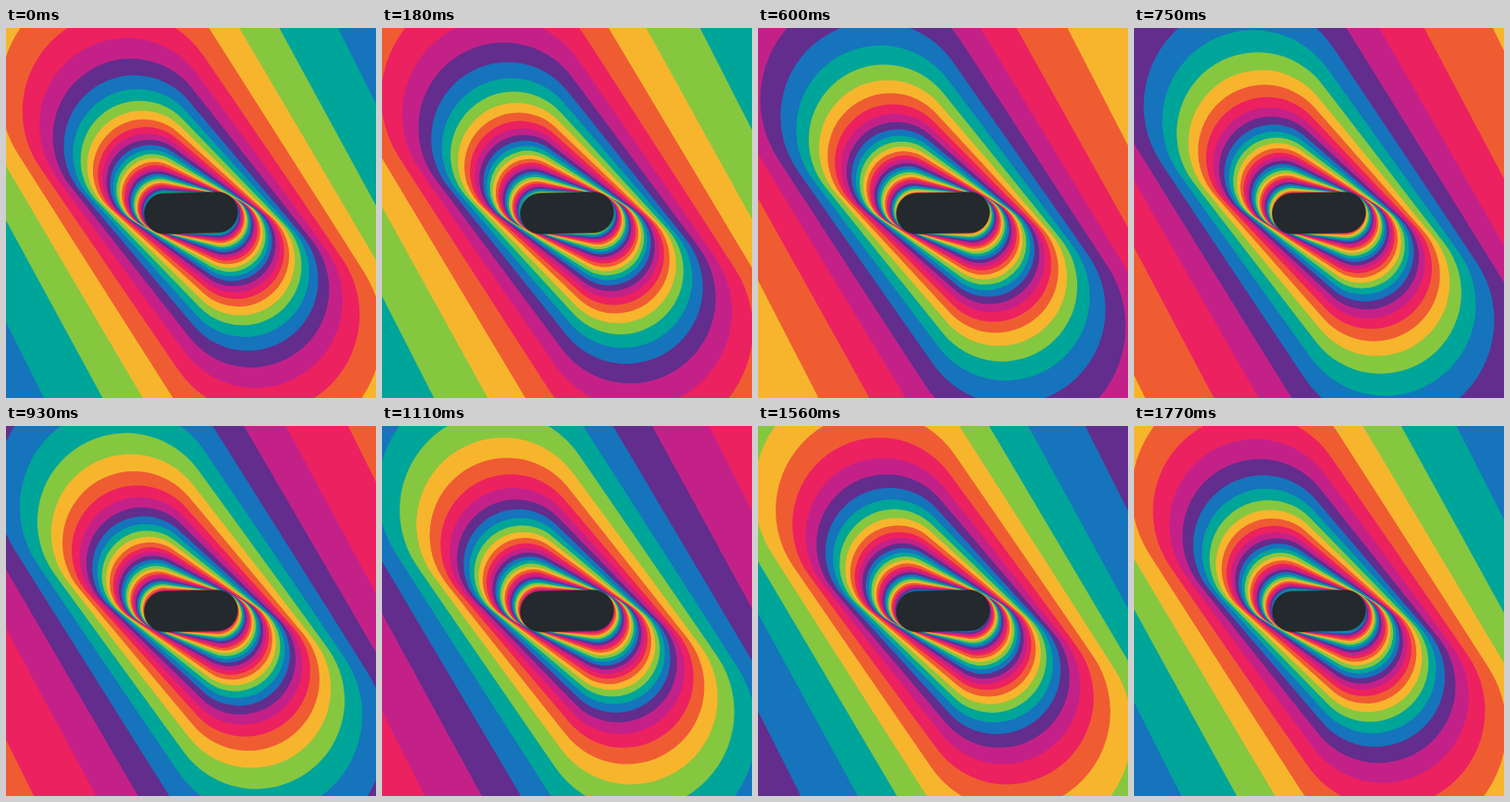
An HTML page with a canvas that plays this animation: 400 px wide and 400 px high, repeating every 1.8 s.

```html
<!DOCTYPE html>
<html lang="en">
<head>
<meta charset="utf-8">
<title>Rainbow twist tunnel</title>
<style>
  html, body { margin: 0; width: 100%; height: 100%; overflow: hidden; background: #23292d; }
  canvas { display: block; width: 400px; height: 400px; }
</style>
</head>
<body>
<canvas id="stage" width="400" height="400"></canvas>
<script>
  const ctx = document.getElementById('stage').getContext('2d');
  const LOOP = 1800, STEP = 30;
  // from the inside outwards
  const COLORS = ['#86c740', '#00a599', '#1574bc', '#622d8d',
                  '#c42188', '#ec2160', '#ef5c32', '#f7b52e'];
  const COUNT = COLORS.length;
  const FAR = -24, NEAR = 12;
  const DARK = '#23292d';

  // Stadium around the centre: cap radius r, half spine r * ratio
  function stadium(r, ratio, degrees) {
    const a = degrees * Math.PI / 180, half = r * ratio;
    const x = half * Math.cos(a), y = half * Math.sin(a);
    ctx.beginPath();
    ctx.arc(200 + x, 200 + y, r, a - Math.PI / 2, a + Math.PI / 2);
    ctx.arc(200 - x, 200 - y, r, a + Math.PI / 2, a + Math.PI * 1.5);
    ctx.closePath();
  }

  // Perspective: size is the inverse of depth, twist is linear in depth
  function ring(depth, color) {
    stadium(1 / (0.01562 - 0.001256 * depth), 1.245, 46 + 1.93 * depth);
    ctx.fillStyle = color;
    ctx.fill();
  }

  function draw(ms) {
    const shift = COUNT * (ms % LOOP) / LOOP;
    for (let i = Math.floor(NEAR - shift); i + shift >= FAR; i--) {
      ring(i + shift, COLORS[(i + COUNT * 10) % COUNT]);
    }
    stadium(21.9, 1.3, -1.3);
    ctx.fillStyle = DARK;
    ctx.fill();
    ctx.strokeStyle = 'rgba(35, 41, 45, 0.5)';
    ctx.lineWidth = 1.4;
    ctx.stroke();
  }

  const start = performance.now();
  function tick() {
    const ms = performance.now() - start;
    draw(Math.floor(ms / STEP) * STEP);
    requestAnimationFrame(tick);
  }
  tick();
</script>
</body>
</html>
```
